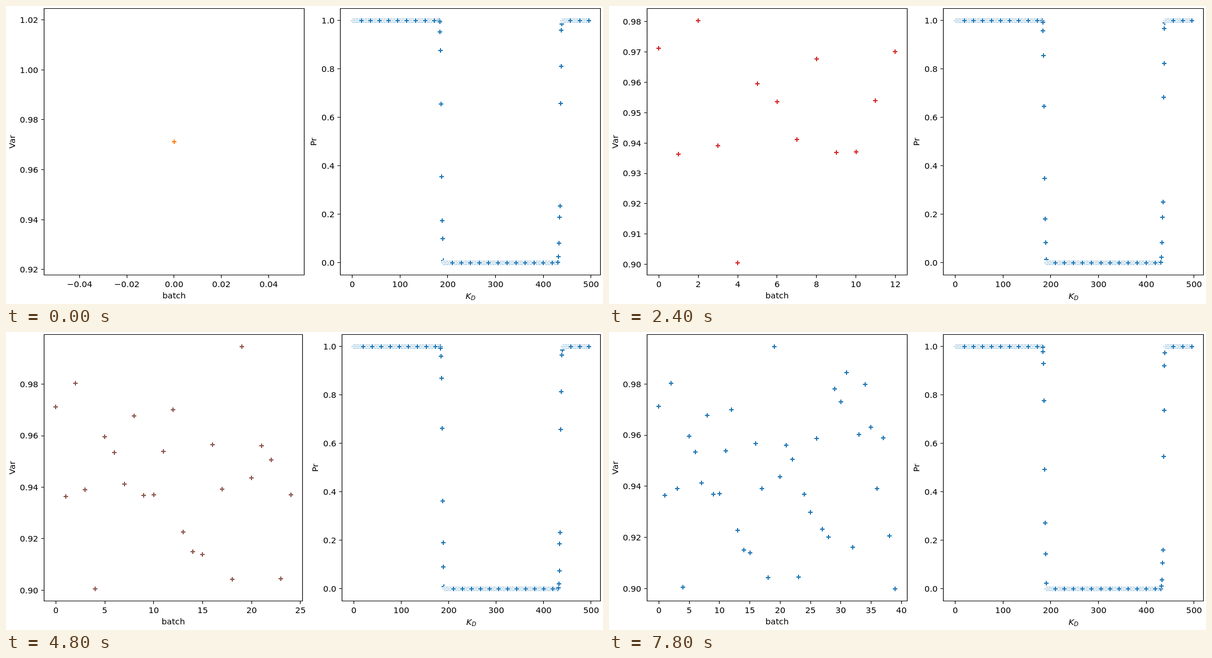
An HTML page for the animation above (8 s loop, 1058 px wide and 529 px high).

```html
<!DOCTYPE html>
<html lang="en">
<head>
<meta charset="utf-8">
<title>Variance and probability by batch</title>
<style>
  html, body { margin: 0; width: 100%; height: 100%; overflow: hidden; background: #fff; }
  svg { display: block; width: 1058px; height: 529px; }
  text { font: 14.69px "DejaVu Sans", sans-serif; }
  .axis { fill: none; stroke: #000; stroke-width: 1.18; }
  .mark { stroke: #fff; stroke-width: 1.4; paint-order: stroke; }
  .math { font-style: italic; }
</style>
</head>
<body>
<svg id="stage" viewBox="0 0 1058 529"></svg>
<script>
const STEP = 200, COUNT = 40;
const EM = 14.69, TICK = 5.14, TOP = 4.4, BOTTOM = 477.5, RIGHT = 1053.6;
const PALETTE = ['#1f77b4', '#ff7f0e', '#2ca02c', '#d62728', '#9467bd',
                 '#8c564b', '#e377c2', '#7f7f7f', '#bcbd22', '#17becf'];

// Variance per batch, in units of 0.0001 above 0.9
const VAR = [712, 364, 803, 391, 5, 595, 535, 412, 677, 368, 371, 539, 700,
  227, 150, 139, 566, 392, 43, 946, 437, 561, 505, 45, 370, 299, 586, 233,
  201, 781, 730, 844, 163, 603, 798, 632, 391, 588, 206, -1].map(v => 0.9 + v / 1e4);

// Edge probabilities in thousandths: falling from K = 183, rising from K = 431
const FALL = 183, RISE = 431;
const KEYS = [
  { n: 0,  fall: [995, 953, 876, 655, 355, 175, 100, 10], rise: [3, 25, 81, 188, 235, 658, 811, 960, 986] },
  { n: 3,  fall: [993, 957, 868, 657, 352, 190, 85, 10],  rise: [6, 24, 76, 190, 236, 677, 810, 965, 990] },
  { n: 12, fall: [992, 957, 855, 647, 349, 181, 83, 13],  rise: [3, 24, 84, 188, 252, 683, 824, 968, 990] },
  { n: 21, fall: [992, 962, 871, 673, 366, 193, 93, 11],  rise: [4, 22, 76, 185, 229, 655, 806, 965, 984] },
  { n: 28, fall: [996, 958, 865, 650, 356, 185, 90, 8],   rise: [3, 20, 73, 190, 235, 660, 822, 965, 987] },
  { n: 34, fall: [995, 970, 888, 684, 396, 208, 104, 11], rise: [3, 17, 56, 160, 215, 632, 784, 957, 986] },
  { n: 39, fall: [997, 980, 929, 776, 493, 271, 144, 23], rise: [1, 11, 37, 108, 160, 547, 736, 921, 975] }
];

const stage = document.getElementById('stage');
const crisp = v => Math.floor(v) + 0.5;
const textWidth = s => [...s].reduce((w, c) => w + (c === '.' ? 0.318 : 0.636), 0) * EM;

function limits(lo, hi) {
  if (lo === hi) {
    const d = 0.05 * (Math.abs(lo) || 1);
    lo -= d;
    hi += d;
  }
  const m = 0.05 * (hi - lo);
  return [lo - m, hi + m];
}

// At most nine intervals of a round size
function ticks([lo, hi]) {
  const raw = (hi - lo) / 9;
  const mag = 10 ** Math.floor(Math.log10(raw));
  const size = [1, 2, 2.5, 5, 10].find(s => s * mag >= raw) * mag;
  let places = 0;
  while (Math.abs(size * 10 ** places - Math.round(size * 10 ** places)) > 1e-6) places++;
  const list = [];
  for (let i = Math.ceil(lo / size - 1e-9); i * size <= hi + 1e-9; i++) {
    list.push({ value: i * size, label: (i * size).toFixed(places).replace('-', '\u2212') });
  }
  return list;
}

const given = (from, to, by, places) =>
  Array.from({ length: Math.round((to - from) / by) + 1 }, (_, i) =>
    ({ value: from + i * by, label: (from + i * by).toFixed(places) }));

function text(x, y, s, anchor = 'middle', extra = '') {
  return `<text x="${x.toFixed(2)}" y="${y.toFixed(2)}" text-anchor="${anchor}" ${extra}>${s}</text>`;
}

function plus(x, y, color) {
  return `<path class="mark" fill="${color}" d="M${Math.round(x) - 1} ${Math.round(y) - 4}` +
    'h2v3h3v2h-3v3h-2v-3h-3v-2h3z"/>';
}

function panel(left, width, xlim, ylim, xticks, yticks, xname, yname) {
  const X = v => left + (v - xlim[0]) / (xlim[1] - xlim[0]) * width;
  const Y = v => BOTTOM - (v - ylim[0]) / (ylim[1] - ylim[0]) * (BOTTOM - TOP);
  const l = crisp(left), r = crisp(left + width), t = crisp(TOP), b = crisp(BOTTOM);
  let lines = `M${l} ${t}H${r}V${b}H${l}Z`, labels = '';
  for (const k of xticks) {
    lines += `M${crisp(X(k.value))} ${b}v${TICK}`;
    labels += text(X(k.value), 499.3, k.label);
  }
  for (const k of yticks) {
    lines += `M${l} ${crisp(Y(k.value))}h${-TICK}`;
    labels += text(left - 2 * TICK, Y(k.value) + 5.4, k.label, 'end');
  }
  const widest = Math.max(...yticks.map(k => textWidth(k.label)));
  const nx = left - 2 * TICK - widest - 8.94, ny = (TOP + BOTTOM) / 2;
  labels += xname(left + width / 2);
  labels += text(nx, ny, yname, 'middle', `transform="rotate(-90 ${nx} ${ny})"`);
  return { X, Y, frame: `<path class="axis" d="${lines}"/>${labels}` };
}

function edges(n) {
  const i = Math.max(1, KEYS.findIndex(k => k.n >= n));
  const a = KEYS[i - 1], b = KEYS[i], f = (n - a.n) / (b.n - a.n);
  const mix = side => a[side].map((v, j) => (v + (b[side][j] - v) * f) / 1000);
  return { fall: mix('fall'), rise: mix('rise') };
}

function probability(k, { fall, rise }) {
  if (k < FALL) return 1;
  if (k < FALL + fall.length) return fall[k - FALL];
  if (k < RISE) return 0;
  if (k < RISE + rise.length) return rise[k - RISE];
  return 1;
}

function draw(n) {
  const data = VAR.slice(0, n + 1);
  const xlim = limits(0, n), ylim = limits(Math.min(...data), Math.max(...data));
  const xt = ticks(xlim), yt = ticks(ylim);

  // Both panels share the width left over by the labels
  const left = 34.8 + Math.max(...yt.map(k => textWidth(k.label)));
  const last = xt[xt.length - 1];
  const room = RIGHT - left - 64.4;
  const spare = (xlim[1] - last.value) / (xlim[1] - xlim[0]) * room / 2;
  const over = Math.max(0, textWidth(last.label) / 2 - spare);
  const width = (room - over) / 2;

  const a = panel(left, width, xlim, ylim, xt, yt, x => text(x, 519, 'batch'), 'Var');
  const b = panel(RIGHT - width, width, limits(0, 495), limits(0, 1),
    given(0, 500, 100, 0), given(0, 1, 0.2, 1),
    x => text(x, 520, 'K<tspan font-size="10.28" dy="2.4">D</tspan>', 'middle', 'class="math"'), 'Pr');

  let marks = data.map((v, i) => plus(a.X(i), a.Y(v), PALETTE[(n + 1) % 10])).join('');
  const p = edges(n);
  const dot = (k, v) => plus(b.X(k), b.Y(v), PALETTE[0]);
  for (let k = 0; k <= 495; k++) marks += dot(k, probability(k, p));
  for (let i = 1; i <= 26; i++) {
    if (i !== 10 && i !== 23) marks += dot(i * 495 / 26, i > 10 && i < 23 ? 0 : 1);
  }
  stage.innerHTML = marks + a.frame + b.frame;
}

let shown = -1;
function tick() {
  const n = Math.floor(performance.now() / STEP) % COUNT;
  if (n !== shown) draw(shown = n);
  requestAnimationFrame(tick);
}
tick();
</script>
</body>
</html>
```
